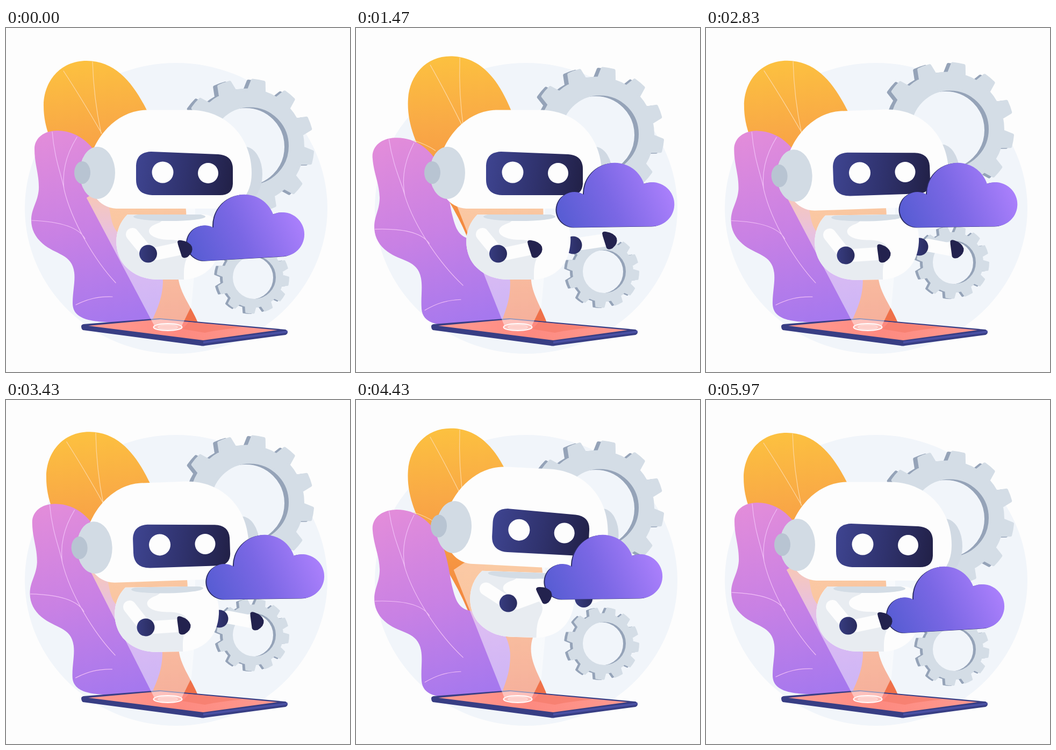
Recreate the animation shown at these times as an HTML page. Size 640x640 px, loop 6010 ms.

```html
<!DOCTYPE html>
<html lang="en">
<head>
<meta charset="utf-8">
<title>Robot and cloud</title>
<style>
  html, body { margin: 0; width: 100%; height: 100%; overflow: hidden; background: #fdfdfd; }
  svg { display: block; width: 100vw; height: 100vh; }
  .vein { fill: none; stroke-width: 1.2; stroke-linecap: round; }
  .limb { stroke: #fdfdfd; stroke-width: 24; stroke-linecap: round; }
</style>
</head>
<body>
<svg viewBox="0 0 640 640">
  <defs>
    <linearGradient id="amber" gradientUnits="userSpaceOnUse" x1="190" y1="60" x2="250" y2="548">
      <stop offset="0" stop-color="#fcc040"/><stop offset=".25" stop-color="#f9a946"/>
      <stop offset=".6" stop-color="#f48c40"/><stop offset="1" stop-color="#ef704a"/>
    </linearGradient>
    <linearGradient id="rose" gradientUnits="userSpaceOnUse" x1="110" y1="190" x2="200" y2="546">
      <stop offset="0" stop-color="#e28cda"/><stop offset=".5" stop-color="#c981e4"/>
      <stop offset="1" stop-color="#a678ee"/>
    </linearGradient>
    <linearGradient id="light" gradientUnits="userSpaceOnUse" x1="0" y1="300" x2="0" y2="556">
      <stop offset="0" stop-color="#fff" stop-opacity=".52"/><stop offset="1" stop-color="#fff" stop-opacity=".45"/>
    </linearGradient>
    <linearGradient id="warm" gradientUnits="userSpaceOnUse" x1="0" y1="310" x2="0" y2="420">
      <stop offset="0" stop-color="#fbc8a4" stop-opacity=".75"/><stop offset="1" stop-color="#fbc8a4" stop-opacity="0"/>
    </linearGradient>
    <linearGradient id="visor" gradientUnits="userSpaceOnUse" x1="242" y1="255" x2="422" y2="285">
      <stop offset="0" stop-color="#3e4490"/><stop offset=".5" stop-color="#30336f"/>
      <stop offset="1" stop-color="#222148"/>
    </linearGradient>
    <linearGradient id="joint" x1="0" y1="0" x2="1" y2="0">
      <stop offset="0" stop-color="#373c80"/><stop offset="1" stop-color="#292b5e"/>
    </linearGradient>
    <linearGradient id="violet" gradientUnits="userSpaceOnUse" x1="390" y1="368" x2="580" y2="285">
      <stop offset="0" stop-color="#595dd4"/><stop offset=".45" stop-color="#7a67e4"/>
      <stop offset="1" stop-color="#ab80fc"/>
    </linearGradient>
    <linearGradient id="screen" gradientUnits="userSpaceOnUse" x1="150" y1="550" x2="500" y2="570">
      <stop offset="0" stop-color="#ff9c92"/><stop offset=".5" stop-color="#fd8a80"/><stop offset="1" stop-color="#ff9a90"/>
    </linearGradient>
    <path id="torsoShape" d="M226 347C200 372 199 415 220 441C238 461 260 468 285 468H335C372 464 396 440 399 400C401 370 390 347 368 347Z"/>
    <clipPath id="torsoClip"><use href="#torsoShape"/></clipPath>
    <path id="hand" fill="#23224e" d="M-14-13Q-13-17-7-16Q8-14 13-4Q16 6 5 15Q-3 19-6 14L-13-8Z"/>
    <path id="cloudShape" d="M406 371A33 33 0 1 1 424 310A57.5 57.5 0 0 1 536 290A41 41 0 1 1 550 369Z"/>
  </defs>

  <rect width="640" height="640" fill="#fdfdfd"/>
  <ellipse cx="316.500" cy="335.500" rx="281.500" ry="270.500" fill="#f1f5fa"/>

  <g id="bigGear"></g>
  <g id="smallGear"></g>

  <g id="amberLeaf">
    <path fill="url(#amber)" d="M357 548C341 510 312 480 322 440C328 410 338 380 335 340C330 270 290 200 262 153C238 105 205 61 150 61C100 61 70 100 70 145C70 235 150 300 197 395C225 450 255 510 262 548Z"/>
    <path class="vein" stroke="#fdd7a0" d="M107 80Q140 130 178 196M161 63Q163 130 177 196M86 222Q110 228 127 238"/>
  </g>
  <g id="roseLeaf">
    <path fill="url(#rose)" d="M97 191C138 192 168 222 180 260C190 295 190 320 193 340C197 362 200 382 222 388C262 400 292 430 292 472C291 505 280 525 270 548H200C165 546 124 545 124 512C124 490 129 472 127 455C123 420 92 422 68 401C54 389 47 374 47 358C47 335 59 325 61 300C62 272 53 255 53 225C53 204 72 190 97 191Z"/>
    <path class="vein" stroke="#f0bdf6" d="M86 193C90 245 104 275 108 300C122 360 165 432 204 474M132 203C112 235 104 268 108 300M48 358C100 360 135 370 147 392M130 515C152 504 172 499 198 500"/>
  </g>

  <path fill="#383e84" d="M144 551L285 540L520 561Q524 563 524 566Q524 569 520 571L370 591Q366 592 362 591L143 562Q140 560 140 555Q140 552 144 551Z"/>
  <path fill="#4a50a4" d="M367 583L524 563L522 567L367 587Z"/>
  <path fill="url(#screen)" d="M153 554L287 542L505 562L367 581Z"/>
  <path fill="#f67c6c" opacity=".7" d="M328 560L340 547L440 557Q390 562 370 567Z"/>

  <path id="beam" fill="url(#light)"/>
  <path id="glow" fill="url(#warm)"/>
  <ellipse cx="301" cy="556.500" rx="26.500" ry="6.500" fill="#fdbcb6" stroke="#fff" stroke-width="2"/>
  <ellipse cx="301" cy="556.500" rx="18.500" ry="4.500" fill="#fecfca" stroke="#ffe6e4"/>

  <line id="foreL" class="limb"/>
  <circle id="elbowL" r="16.500" fill="url(#joint)"/>
  <use id="handL" href="#hand"/>
  <g id="torso">
    <use href="#torsoShape" fill="#fdfdfd"/>
    <g clip-path="url(#torsoClip)">
      <path fill="#e8ecf1" d="M195 340H250C292 352 300 358 278 365C255 375 266 393 302 394C336 394 346 406 338 425C330 440 331 455 331 470H195Z"/>
      <ellipse cx="304" cy="351" rx="67" ry="8" fill="#d3dce5"/>
    </g>
  </g>
  <line id="upperR" class="limb"/>
  <line id="foreR" class="limb"/>
  <circle id="elbowR" r="16.500" fill="url(#joint)"/>

  <g id="head">
    <ellipse cx="445" cy="272" rx="32" ry="51" fill="#d0d9e3"/>
    <path fill="#fdfdfd" d="M260 152.500H345C412 154 457 205 457 270C457 312 432 336 395 336H205C170 334 150 300 152 262C160 205 205 154 260 152.500Z"/>
    <ellipse cx="170" cy="269.500" rx="33" ry="48.500" fill="#d2dbe4"/>
    <ellipse cx="142" cy="269" rx="15" ry="21" fill="#b8c4d2"/>
    <path fill="url(#visor)" d="M270 230L395 235Q422 237 422 262V290Q421 311 398 311H272Q242 310 242 282V256Q243 231 270 230Z"/>
    <circle cx="291.500" cy="268.500" r="20" fill="#fdfdfd"/>
    <circle cx="376" cy="270" r="19" fill="#fdfdfd"/>
  </g>

  <g id="cloud">
    <use href="#cloudShape" x="-2" y=".5" fill="#2b2c66"/>
    <use href="#cloudShape" fill="url(#violet)"/>
  </g>
  <use id="handR" href="#hand"/>
</svg>

<script>
const LOOP = 6010;
const RAD = Math.PI / 180;
const $ = id => document.getElementById(id);

// Closed gear outline with twelve teeth; skew crowds the teeth towards one side.
function gearPath({ cx, cy, root, tip, base, top, turn, skew = 0, holeX, hole }) {
  const at = (r, deg) =>
    (cx + r * Math.cos(deg * RAD)).toFixed(1) + ' ' + (cy + r * Math.sin(deg * RAD)).toFixed(1);
  let d = '', first;
  for (let k = 0; k < 12; k++) {
    const even = turn + 30 * k;
    const a = even - skew * Math.cos((even - 65) * RAD);
    const foot = at(root, a - base);
    first = first || foot;
    d += (k ? `A${root} ${root} 0 0 1 ` : 'M') + foot;
    d += 'L' + at(tip, a - top) + `A${tip} ${tip} 0 0 1 ` + at(tip, a + top) + 'L' + at(root, a + base);
  }
  d += `A${root} ${root} 0 0 1 ${first}Z`;
  return d + `M${holeX - hole} ${cy}a${hole} ${hole} 0 1 0 ${2 * hole} 0a${hole} ${hole} 0 1 0 ${-2 * hole} 0Z`;
}

function buildGear(id, path, round, dx, dy) {
  const layer = (color, shift) =>
    `<path d="${path}" fill-rule="evenodd" fill="${color}" stroke="${color}" stroke-width="${round}" stroke-linejoin="round" ${shift}/>`;
  $(id).innerHTML = layer('#95a3b8', `transform="translate(${dx} ${dy})"`) + layer('#d4dde6', '');
}
buildGear('bigGear', gearPath({
  cx: 448, cy: 219.5, root: 104, tip: 122.5, base: 8, top: 5, turn: -80, holeX: 454, hole: 75
}), 6, -8, 1.5);
buildGear('smallGear', gearPath({
  cx: 459.5, cy: 464, root: 55, tip: 66, base: 9.5, top: 6.2, turn: 9, skew: 5, holeX: 462, hole: 41.5
}), 3, -5, .5);

// Smooth track through (time, value) points, without overshoot.
function track(times, values) {
  const n = times.length;
  const rise = i => (values[i + 1] - values[i]) / (times[i + 1] - times[i]);
  const slope = values.map((_, i) => {
    if (!i || i === n - 1) return 0;
    const a = rise(i - 1), b = rise(i);
    return a * b <= 0 ? 0 : 2 * a * b / (a + b);
  });
  return t => {
    if (t >= times[n - 1]) return values[n - 1];
    let i = 0;
    while (t >= times[i + 1]) i++;
    const h = times[i + 1] - times[i], u = (t - times[i]) / h, v = 1 - u;
    return values[i] * (1 + 2 * u) * v * v + h * slope[i] * u * v * v
      + values[i + 1] * u * u * (3 - 2 * u) - h * slope[i + 1] * u * u * v;
  };
}

// Pose: head x y turn, torso x y turn, shoulder, right elbow, right hand + turn, left elbow, left hand + turn.
const rest = [0, 0, 0, 0, 0, 0, 235, 384, 264.5, 420, 333, 411, 0, 404, 404, 472, 395, 0];
const lift = [12.5, -26.7, 3, 7, -27, 2, 242, 351, 283.5, 377.5, 351, 362, -9, 424, 369, 490, 352, -8];
const lean = [-5.8, .6, -2, -3, .5, -1, 230, 385, 260, 423, 330, 420, 10, 397, 407, 466, 412, 10];
const poses = [rest, lift, rest, lean, lean, lift, rest];
const beats = [0, 670, 1470, 2270, 3430, 4500, 5250];
const joints = rest.map((_, j) => track(beats, poses.map(p => p[j])));

const gearBeats = [0, 670, 1470, 2270, 2900, 3430, 4430, 5970];
const bigY = track(gearBeats, [0, -8, -22, -30, -31, -29, -19, 0]);
const smallY = track(gearBeats, [0, -3.5, -11, -22, -28, -27, -11, 0]);

// The robot lifts the cloud, lets it drift, then takes it down again.
const cloudX = track([0, 670, 1500, 2500, 3500, 4550, 5250], [-37.5, -25, 0, -17.5, 0, -25, -37.5]);
const cloudDrop = track([0, 670, 4500, 5250], [1, 0, 0, 1]);

const move = (id, x, y, turn = 0, cx = 0, cy = 0) =>
  $(id).setAttribute('transform', `translate(${x} ${y}) rotate(${turn} ${cx} ${cy})`);

function limb(id, x1, y1, x2, y2) {
  Object.entries({ x1, y1, x2, y2 }).forEach(([k, v]) => $(id).setAttribute(k, v));
}

function draw(t) {
  const sway = (1 - Math.cos(4 * Math.PI * t / LOOP)) / 2;
  move('bigGear', 0, bigY(t));
  move('smallGear', 0, smallY(t));
  move('amberLeaf', 0, 0, 3.8 * sway, 290, 545);
  move('roseLeaf', 0, 0, -4.1 * sway, 270, 545);

  const left = 150 + 32 * sway;
  $('beam').setAttribute('d', `M276 554L${left} 316L${left + 30} 296H352V440L345 517L327 554Q301 566 276 554Z`);
  const foot = left + (276 - left) * 104 / 238;
  $('glow').setAttribute('d', `M${left} 316L${left + 30} 296H240V420H${foot}Z`);

  const [hx, hy, hr, bx, by, br, sx, sy, ex, ey, rx, ry, rr, fx, fy, lx, ly, lr] = joints.map(f => f(t));
  move('head', hx, hy, hr, 300, 260);
  move('torso', bx, by, br, 304, 400);
  limb('upperR', sx, sy, ex, ey);
  limb('foreR', ex + 14, ey, rx - 12, ry);
  move('elbowR', ex, ey);
  move('handR', rx, ry, rr);
  limb('foreL', fx + 16, fy - 3, lx - 12, ly);
  move('elbowL', fx, fy);
  move('handL', lx, ly, lr);

  const drop = cloudDrop(t);
  move('cloud', cloudX(t), 59 * drop, -2.5 * drop, 481, 320);
}

const start = performance.now();
function tick() {
  draw((performance.now() - start) % LOOP);
  requestAnimationFrame(tick);
}
tick();
</script>
</body>
</html>
```
